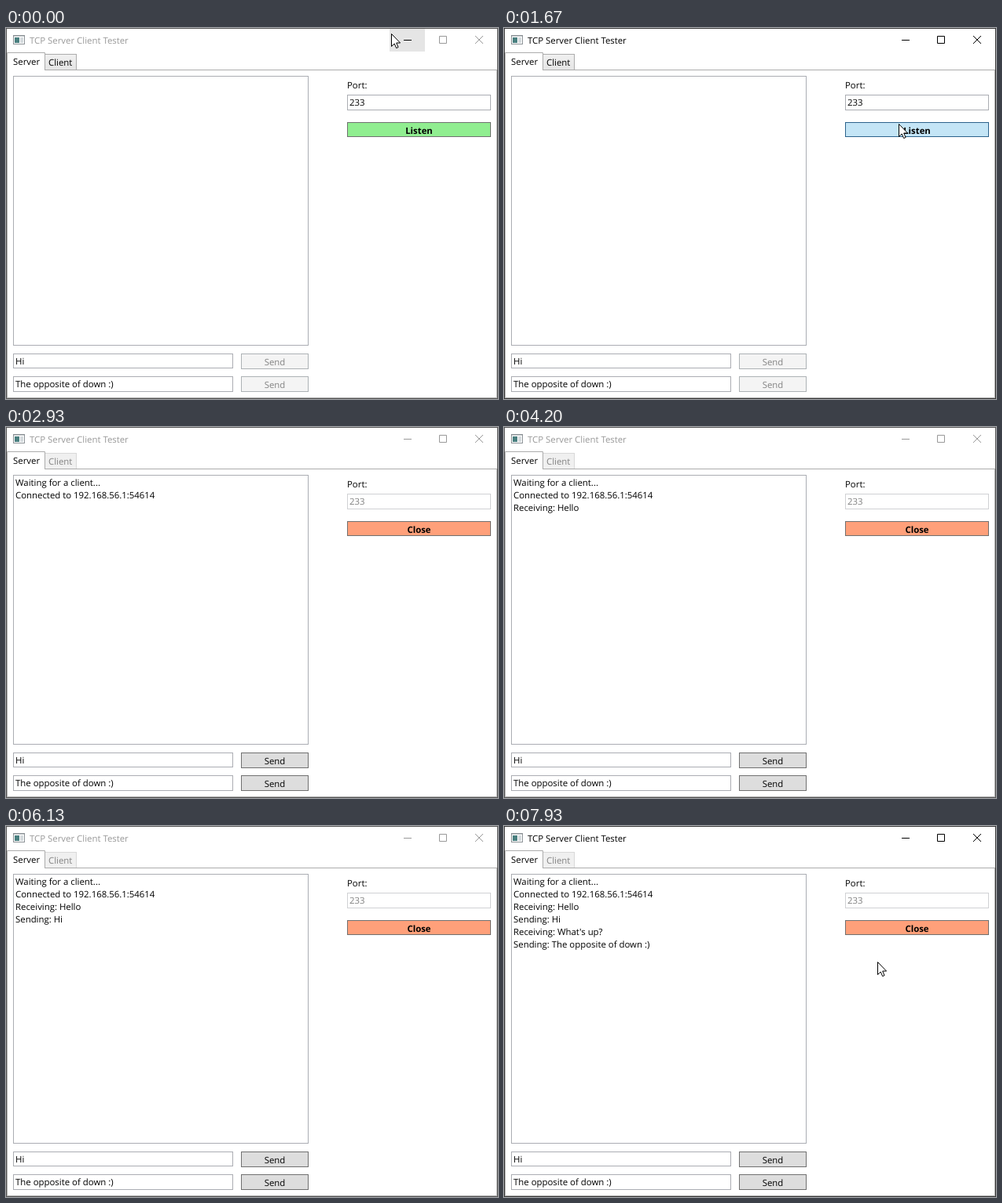
Recreate the animation shown at these times as an HTML page. Size 626 by 473 pixels, loop 8000 ms.

```html
<!DOCTYPE html>
<html lang="en">
<head>
<meta charset="utf-8">
<title>TCP Server Client Tester</title>
<style>
  html, body { margin: 0; width: 100%; height: 100%; overflow: hidden; background: #fff; }
  svg { display: block; width: 626px; height: 473px; }
  text { font: 11.4px "Open Sans", "Noto Sans", sans-serif; text-rendering: geometricPrecision; fill: #000; white-space: pre; }
  .bold { font-weight: 700; text-anchor: middle; }
  .mid { text-anchor: middle; }
  .field { fill: #fff; stroke: #abadb3; }
  .tab { fill: #fff; stroke: #acacac; }

  /* One loop is 120 ticks; the small lead keeps ticks clear of rounding. */
  .a { animation: 8s step-end -6ms infinite; }

  .frame { animation-name: frame; }
  .caption { animation-name: caption; }
  .caption text { fill: currentColor; }
  .minhot { animation-name: minhot; }
  .minfade { animation-name: minfade; }
  .idle { animation-name: idle; }
  .busy { animation-name: busy; }
  .main { animation-name: main; }
  .closetext { animation-name: closetext; }
  .sendtext { animation-name: sendtext; }
  .send1 { animation-name: send1; }
  .send2 { animation-name: send2; }
  .lines { animation-name: lines; }
  .cursor { animation-name: cursor; }

  @keyframes frame {
    0%, 35%, 76.667% { stroke: #565656; }
    20.833%, 64.167%, 89.167% { stroke: #383838; }
  }
  @keyframes caption {
    0%, 35%, 76.667% { color: #999; }
    20.833%, 64.167%, 89.167% { color: #000; }
  }
  @keyframes minhot {
    0% { opacity: 1; }
    11.667% { opacity: .6; }
    12.5% { opacity: .25; }
    13.333%, 100% { opacity: 0; }
  }
  @keyframes idle { 0% { visibility: visible; } 22.5%, 100% { visibility: hidden; } }
  @keyframes busy { 0% { visibility: hidden; } 22.5%, 100% { visibility: visible; } }
  @keyframes main {
    0% { fill: #90ee90; stroke: #707070; }
    17.5% { fill: #bee6fd; stroke: #3c7fb1; }
    20.833% { fill: #c4e5f6; stroke: #2c628b; }
    22.5% { fill: #f4f4f4; stroke: #adb2b5; }
    36.667%, 100% { fill: #ffa07a; stroke: #707070; }
  }
  @keyframes closetext { 0% { fill: #838383; } 36.667%, 100% { fill: #000; } }
  @keyframes sendtext { 0% { fill: #838383; } 36.667%, 100% { fill: #000; } }
  @keyframes send1 {
    0% { fill: #f4f4f4; stroke: #adb2b5; }
    36.667%, 68.333%, 100% { fill: #ddd; stroke: #707070; }
    61.667%, 65.833% { fill: #bee6fd; stroke: #3c7fb1; }
    64.167% { fill: #c4e5f6; stroke: #2c628b; }
  }
  @keyframes send2 {
    0% { fill: #f4f4f4; stroke: #adb2b5; }
    36.667%, 93.333%, 100% { fill: #ddd; stroke: #707070; }
    86.667%, 90.833% { fill: #bee6fd; stroke: #3c7fb1; }
    89.167% { fill: #c4e5f6; stroke: #2c628b; }
  }
  @keyframes lines {
    0% { height: 0; }
    22.5% { height: 16px; }
    36.667% { height: 32px; }
    52.5% { height: 48px; }
    65.833% { height: 64px; }
    78.333% { height: 80px; }
    90.833%, 100% { height: 96px; }
  }
  @keyframes cursor {
    0% { transform: translate(490px, 7px); }
    9.167% { transform: translate(490px, 7px); animation-timing-function: steps(3); }
    11.667% { transform: translate(491px, 24px); animation-timing-function: steps(4); }
    15% { transform: translate(497px, 100px); animation-timing-function: steps(2); }
    16.667% { transform: translate(499px, 116px); }
    17.5% { transform: translate(502px, 122px); }
    22.5% { transform: translate(502px, 122px); animation-timing-function: steps(3); }
    25% { transform: translate(640px, 170px); }
    55.833% { transform: translate(640px, 395px); animation-timing-function: steps(5); }
    60% { transform: translate(420px, 415px); animation-timing-function: steps(3); }
    62.5% { transform: translate(347px, 426px); }
    67.5% { transform: translate(347px, 426px); animation-timing-function: steps(2); }
    69.167% { transform: translate(593px, 420px); }
    70% { transform: translate(640px, 420px); }
    81.667% { transform: translate(640px, 400px); animation-timing-function: steps(5); }
    85.833% { transform: translate(400px, 445px); animation-timing-function: steps(3); }
    88.333% { transform: translate(345px, 454px); }
    92.5% { transform: translate(345px, 454px); animation-timing-function: steps(3); }
    95% { transform: translate(415px, 400px); animation-timing-function: steps(3); }
    97.5% { transform: translate(462px, 225px); animation-timing-function: steps(2); }
    99.167%, 100% { transform: translate(475px, 173px); }
  }
</style>
</head>
<body>
<svg viewBox="0 0 626 473">
  <defs>
    <clipPath id="shown"><rect class="a lines" x="10" y="63" width="374" height="0"/></clipPath>
    <linearGradient id="tabfill" x2="0" y2="1">
      <stop stop-color="#f0f0f0"/><stop offset="1" stop-color="#e5e5e5"/>
    </linearGradient>
  </defs>
  <rect width="626" height="473" fill="#fff"/>

  <!-- title bar -->
  <rect class="a minhot" x="488" y="1" width="45" height="29" fill="#e5e5e5"/>
  <rect x="9.5" y="9.5" width="14" height="11" fill="#fff" stroke="#8c9296"/>
  <path d="M10 10.5H23" stroke="#c3c8cb"/>
  <rect x="11" y="12" width="6" height="7" fill="#4a8080"/>
  <rect x="18" y="12" width="4" height="7" fill="#d4dadd"/>
  <g class="a caption" fill="none" stroke="currentColor">
    <text x="30" y="20" stroke="none">TCP Server Client Tester</text>
    <path d="M506 15.5H516M551.5 10.5H560.5V19.5H551.5Z"/>
    <path d="M597 10L607 20M607 10L597 20"/>
  </g>
  <path class="a minhot" d="M506 15.5H516" stroke="#000"/>

  <!-- tabs -->
  <rect class="tab" x="1.5" y="53.5" width="623" height="418"/>
  <g class="a idle">
    <rect x="49.5" y="33.5" width="40" height="20" fill="url(#tabfill)" stroke="#acacac"/>
    <text x="54" y="48">Client</text>
  </g>
  <g class="a busy">
    <rect x="49.5" y="33.5" width="40" height="20" fill="#f0f0f0" stroke="#d9d9d9"/>
    <path d="M49 53.5H90" stroke="#acacac"/>
    <text x="54" y="48" style="fill:#838383">Client</text>
  </g>
  <path class="tab" d="M1.5 54V31.5H49.5V54"/>
  <path d="M2 53.5H49" stroke="#fff"/>
  <text x="9" y="47">Server</text>

  <!-- log -->
  <rect class="field" x="9.5" y="61.5" width="375" height="343"/>
  <g clip-path="url(#shown)">
    <text x="12" y="75">Waiting for a client...</text>
    <text x="12" y="91">Connected to 192.168.56.1:54614</text>
    <text x="12" y="107">Receiving: Hello</text>
    <text x="12" y="123">Sending: Hi</text>
    <text x="12" y="139">Receiving: What's up?</text>
    <text x="12" y="155">Sending: The opposite of down :)</text>
  </g>

  <!-- port -->
  <text x="434" y="77">Port:</text>
  <g class="a idle">
    <rect class="field" x="434.5" y="85.5" width="182" height="19"/>
    <text x="437" y="99">233</text>
  </g>
  <g class="a busy">
    <rect x="434.5" y="85.5" width="182" height="19" fill="#fff" stroke="#d0d1d4"/>
    <text x="437" y="99" style="fill:#7f7f7f">233</text>
  </g>
  <rect class="a main" x="434.5" y="120.5" width="182" height="18"/>
  <g class="a idle"><text class="bold" x="525.5" y="135">Listen</text></g>
  <g class="a busy"><text class="a bold closetext" x="525.5" y="135">Close</text></g>

  <!-- messages -->
  <rect class="field" x="9.5" y="415.5" width="279" height="18"/>
  <text x="12" y="429">Hi</text>
  <rect class="a send1" x="299.5" y="415.5" width="85" height="19"/>
  <text class="a mid sendtext" x="342" y="430">Send</text>
  <rect class="field" x="9.5" y="444.5" width="279" height="19"/>
  <text x="12" y="458">The opposite of down :)</text>
  <rect class="a send2" x="299.5" y="444.5" width="85" height="19"/>
  <text class="a mid sendtext" x="342" y="459">Send</text>

  <rect class="a frame" x=".5" y=".5" width="625" height="472" fill="none"/>
  <path class="a cursor" d="M.5.5V16.5L4.2 13L6.7 18.6L9.1 17.5L6.7 12H11.6Z" fill="#fff" stroke="#000"/>
</svg>
</body>
</html>
```
